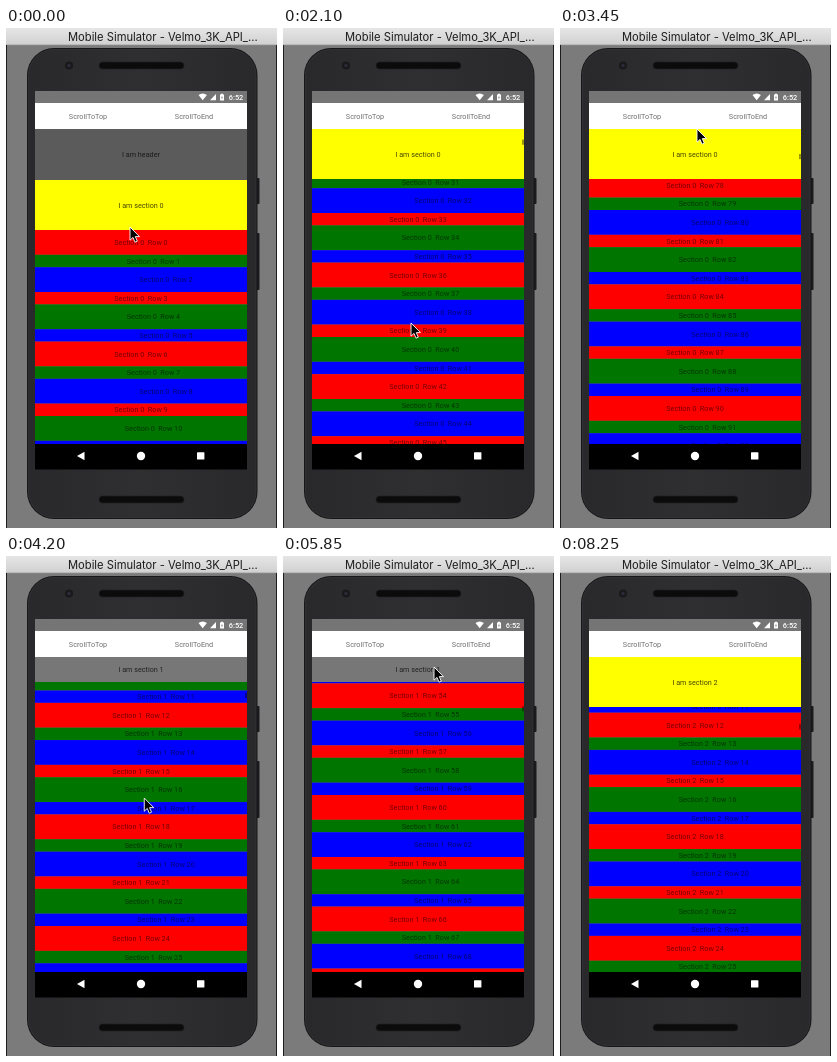
Animation, 271 px wide and 500 px high, one loop 8.4 s. Source, as an HTML page:

```html
<!DOCTYPE html>
<html lang="en">
<head>
<meta charset="utf-8">
<title>Sectioned list</title>
<style>
html, body { margin: 0; width: 100%; height: 100%; overflow: hidden; background: #7b7b7b; }
svg { display: block; width: 100vw; height: 100vh; }
text { font: 7.22px Roboto, sans-serif; text-anchor: middle; white-space: pre; }
.title { font: 11.2px Inter, sans-serif; text-anchor: start; fill: #1c1c1c; }
.clock { font-size: 7.4px; font-weight: 500; fill: #fff; }
.tool { fill: #6f6f6f; }
.cell { fill: #000; fill-opacity: .55; }
.head { fill: #000; fill-opacity: .72; }
</style>
</head>
<body>
<svg viewBox="0 0 271 500" preserveAspectRatio="none">
  <defs>
    <linearGradient id="bar" x2="0" y2="1">
      <stop stop-color="#e6e6e6"/><stop offset="1" stop-color="#d0d0d0"/>
    </linearGradient>
    <linearGradient id="body" x2="1" y2="0">
      <stop stop-color="#29282b"/><stop offset=".5" stop-color="#2f2e31"/><stop offset="1" stop-color="#29282b"/>
    </linearGradient>
    <clipPath id="view"><rect x="29" y="101" width="212" height="315"/></clipPath>
  </defs>

  <rect width="271" height="500" fill="#7b7b7b"/>
  <rect width="271" height="17" fill="url(#bar)"/>
  <rect y="16.5" width="271" height=".7" fill="#a4a4a4"/>
  <path d="M.5 17V500M270.5 17V500" stroke="#1d1d1d"/>
  <text class="title" x="62" y="13">Mobile Simulator - Velmo_3K_API_...</text>

  <rect x="250" y="150" width="3.5" height="26" rx="1" fill="#1b1b1d"/>
  <rect x="250" y="205" width="3.5" height="57" rx="1" fill="#1b1b1d"/>
  <rect x="21" y="20" width="230.5" height="471" rx="27" fill="#171719"/>
  <rect x="22.5" y="21.5" width="227.5" height="468" rx="25.5" fill="url(#body)" stroke="#39383b" stroke-width=".7"/>
  <circle cx="63" cy="37.5" r="4" fill="#19191c"/>
  <circle cx="63" cy="37.5" r="1.7" fill="#2c2c3c"/>
  <g fill="#0b0b0c" stroke="#202022" stroke-width=".7">
    <rect x="93" y="34" width="85" height="7" rx="3.5"/>
    <rect x="93" y="468" width="85" height="7" rx="3.5"/>
  </g>

  <rect x="29" y="63" width="212" height="12" fill="#757575"/>
  <g fill="#fff">
    <path d="M192.5 67q4.2-3.2 8.4 0l-4.2 5.2zM204 72.3h6v-6.2z"/>
    <path d="M214 66.6h1v-.9h2v.9h1v6h-4z"/>
    <path d="M216.3 67.4l-1.2 2.3h.8l-.4 2 1.4-2.5h-.8z" fill="#757575"/>
  </g>
  <text class="clock" x="230" y="71.8">6:52</text>
  <rect x="29" y="75" width="212" height="26" fill="#fff"/>
  <text class="tool" x="82" y="90.6">ScrollToTop</text>
  <text class="tool" x="188" y="90.6">ScrollToEnd</text>

  <rect x="29" y="101" width="212" height="315" fill="#777"/>
  <g id="list" clip-path="url(#view)"></g>

  <rect x="29" y="416" width="212" height="25.5" fill="#000"/>
  <g fill="#fff">
    <path d="M71 428l7.5-4.3v8.6z"/>
    <circle cx="135" cy="428" r="4.2"/>
    <rect x="191" y="424.2" width="7.4" height="7.4" rx=".6"/>
  </g>
  <path id="cursor" d="M0 0V13.2L3 10.4L5 15.2L7.3 14.2L5.3 9.6H9.5Z" fill="#000" stroke="#fff" stroke-width=".9"/>
</svg>
<script>
const LOOP = 8400, STEP = 150;
const TOP = 101, VIEW = 315, HEADER = 51;
const TALL = 24.8, PAIR = 37.2, ROWS = 100, SECTIONS = 10;
const COLORS = ['#f00', '#007500', '#00f'];
const list = document.getElementById('list');
const cursor = document.getElementById('cursor');

const linear = p => p;
const fling = p => 1 - (1 - p) ** 2;
const glide = p => p * p * (3 - 2 * p);

// [time, offset, easing towards this point]: drags are linear, flings slow down
const SCROLL = [
  [0, 0], [450, 0, linear], [900, 180, linear], [2100, 637, fling],
  [2400, 822, linear], [3000, 1318, fling], [3450, 1508, linear],
  [4050, 2100, fling], [4500, 2290, linear], [4950, 2730, fling],
  [5350, 2784, fling], [5850, 2964, linear], [6450, 3457, fling],
  [6900, 3646.8, linear], [8250, 4063.5, fling]
];
const POINTER = [
  [0, 124, 199], [450, 125, 290], [900, 127, 110], [1650, 128, 295],
  [2100, 128, 295], [2400, 130, 110], [3000, 134, 291], [3450, 137, 101],
  [4050, 138, 290], [4500, 139, 105], [4950, 140, 197], [5350, 146, 291],
  [5850, 151, 111], [6450, 152, 297], [6900, 153, 107], [7500, 154, 107]
];

function sample(track, t, col, ease) {
  const i = track.findIndex(k => k[0] > t);
  if (i < 0) return track[track.length - 1][col];
  const a = track[i - 1], b = track[i];
  return a[col] + (b[col] - a[col]) * (ease || b[2])((t - a[0]) / (b[0] - a[0]));
}

const headHeight = s => s % 2 ? 25 : 50;
const rowTop = i => Math.floor(i / 2) * PAIR + (i % 2) * TALL;

function block(y, h, fill, label, x, cls) {
  return `<rect x="29" y="${y}" width="212" height="${h}" fill="${fill}"/>` +
    `<text class="${cls}" x="${x}" y="${y + h / 2 + 2.5}">${label}</text>`;
}

function row(section, i, y, stale) {
  const n = stale ? i + 44 : i, c = n % 3;
  const label = `Section ${stale ? section - 1 : section}  Row ${n}`;
  return block(y, i % 2 ? PAIR - TALL : TALL, COLORS[c], label, 135 + c * 12.5, 'cell');
}

function drawList(scroll, t) {
  let cells = block(TOP - scroll, HEADER, '#5b5b5b', 'I am header', 135, 'head');
  let heads = '', y = TOP + HEADER - scroll;
  for (let s = 0; s < SECTIONS; s++) {
    const h = headHeight(s), first = y + h, end = first + rowTop(ROWS);
    if (y < TOP + VIEW && end > TOP) {
      // recycled cells keep their old content until refreshed
      const stale = s === 2 && t < 7050;
      for (let i = 0; i < ROWS; i++) {
        const ry = first + rowTop(i);
        if (ry > TOP - TALL && ry < TOP + VIEW) cells += row(s, i, ry, stale);
      }
      const pinned = Math.min(Math.max(y, TOP), end - h);
      heads += block(pinned, h, s % 2 ? '#777' : '#ff0', `I am section ${s}`, 135, 'head');
    }
    y = end;
  }
  const total = y + scroll - TOP, size = VIEW * VIEW / total;
  const thumb = scroll ? `<rect x="239" y="${TOP + scroll / total * VIEW}" width="2" height="${size}" fill="#000" fill-opacity=".4"/>` : '';
  list.innerHTML = cells + heads + thumb;
}

let last = -1;
function tick() {
  const t = Math.floor(performance.now() % LOOP / STEP) * STEP;
  if (t !== last) {
    last = t;
    drawList(sample(SCROLL, t, 1), t);
    const x = sample(POINTER, t, 1, glide), y = sample(POINTER, t, 2, glide);
    cursor.setAttribute('transform', `translate(${x} ${y})`);
    cursor.style.display = t < 7500 ? '' : 'none';
  }
  requestAnimationFrame(tick);
}
tick();
</script>
</body>
</html>
```
